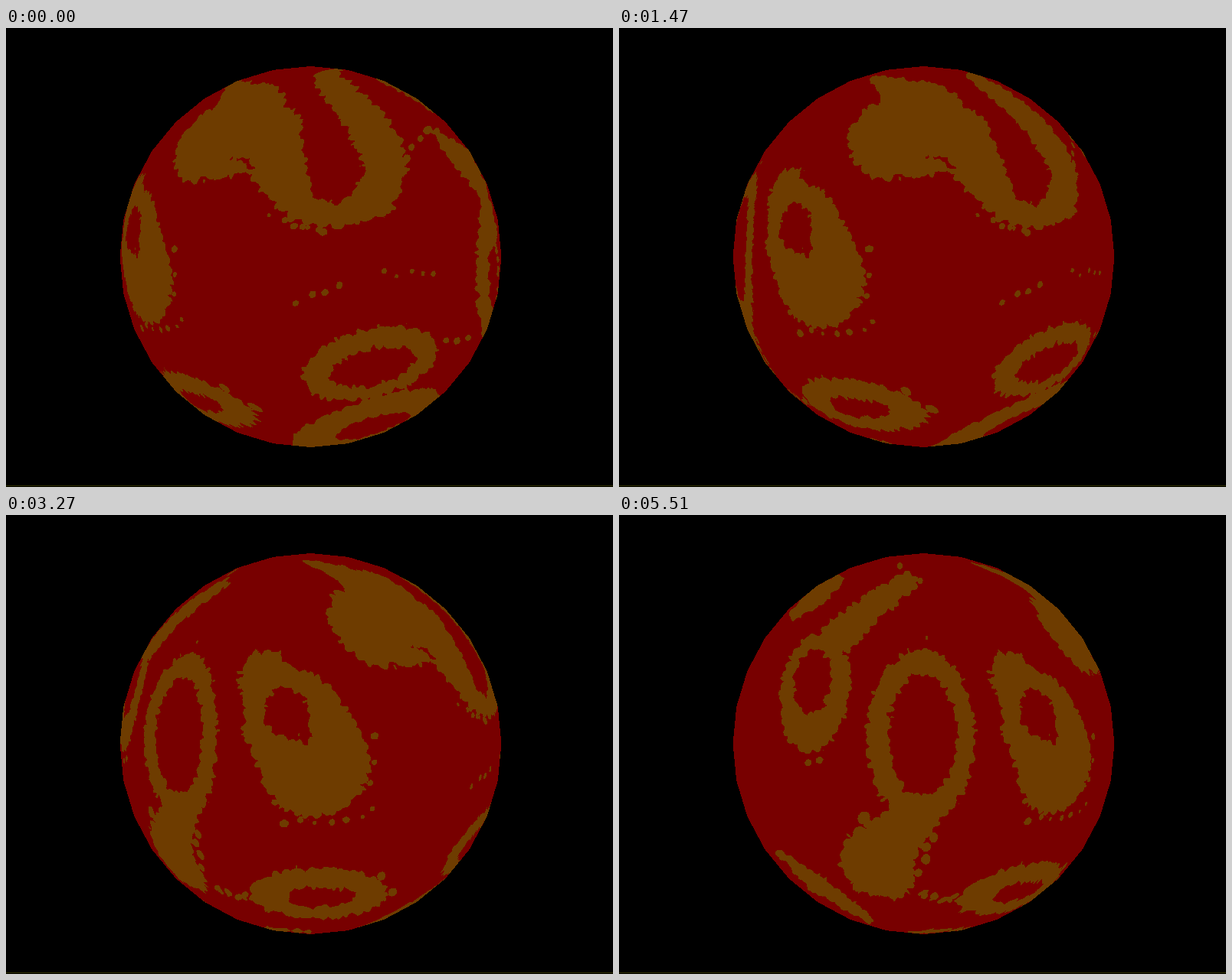
An HTML page with a canvas for the animation above (5550 ms loop, 792 by 600 pixels).

```html
<!DOCTYPE html>
<html lang="en">
<head>
<meta charset="utf-8">
<title>Rotating planet</title>
<style>
  html, body { margin: 0; width: 100%; height: 100%; overflow: hidden; background: #000; }
  canvas { display: block; width: 792px; height: 600px; }
</style>
</head>
<body>
<canvas id="stage" width="792" height="600"></canvas>
<script>
const LOOP = 5550, SPIN = 0.000288; // radians per ms
const CX = 397.5, CY = 299, R = 249, DIST = 5, FOCAL = R * Math.sqrt(DIST * DIST - 1);
// Surface map: pixels per radian, western edge, size
const PPR = 344, WEST = -3.3, MAP_W = Math.ceil(5 * PPR), MAP_H = Math.ceil(Math.PI * PPR);
const turn = t => SPIN * t;

let seed = 7;
function rand(a, b) {
  seed = (seed * 16807) % 2147483647;
  return a + (b - a) * seed / 2147483647;
}

// Shapes are signed distances in screen pixels, negative inside.
// Chain of round joints x, y, r joined by tapering limbs
function arm(...joints) {
  return (x, y) => {
    let best = Infinity;
    for (let i = 0; i + 5 < joints.length; i += 3) {
      const [ax, ay, ar, bx, by, br] = joints.slice(i, i + 6);
      const dx = bx - ax, dy = by - ay;
      const u = Math.max(0, Math.min(1, ((x - ax) * dx + (y - ay) * dy) / (dx * dx + dy * dy)));
      best = Math.min(best, Math.hypot(x - ax - u * dx, y - ay - u * dy) - ar - u * (br - ar));
    }
    return best;
  };
}

// Ellipse, tilted clockwise in degrees
function oval(cx, cy, rx, ry, tilt = 0) {
  const c = Math.cos(tilt * Math.PI / 180), s = Math.sin(tilt * Math.PI / 180);
  return (x, y) => {
    const u = ((x - cx) * c + (y - cy) * s) / rx, v = ((y - cy) * c - (x - cx) * s) / ry;
    const k = Math.hypot(u, v);
    return k * (k - 1) / (Math.hypot(u / rx, v / ry) || 1);
  };
}

// Row of n loose drops from one point to another
function trail(x0, y0, x1, y1, n, size = 4) {
  return Array.from({ length: n }, (_, i) => {
    const u = n > 1 ? i / (n - 1) : 0, r = size * rand(0.6, 1.1);
    return oval(x0 + u * (x1 - x0) + rand(-3, 3), y0 + u * (y1 - y0) + rand(-4, 4), r, r * 1.15, rand(0, 90));
  });
}

// Each group is laid out as it appears on screen at time t
const VIEWS = [
  {
    t: 0,
    land: [
      oval(475, 438, 90, 44, -15), oval(470, 512, 102, 25, -18), oval(628, 318, 14, 92),
      arm(560, 137, 5, 595, 170, 14, 622, 212, 7, 632, 260, 6),
      arm(480, 65, 1, 520, 82, 3, 556, 108, 1),
    ],
    holes: [oval(477, 443, 58, 24, -14), oval(478, 520, 52, 11, -17), oval(636, 325, 6, 42)],
    drops: [
      ...trail(340, 246, 410, 264, 4), ...trail(380, 358, 432, 337, 4), ...trail(494, 320, 560, 322, 5, 3),
      ...trail(520, 170, 550, 130, 4, 5), ...trail(574, 408, 604, 406, 3),
    ],
  },
  {
    t: 1470,
    land: [
      arm(335, 67, 6, 365, 88, 22, 395, 130, 60),
      arm(350, 148, 50, 395, 132, 62, 445, 145, 39, 470, 185, 31, 505, 236, 18, 545, 248, 13,
        576, 230, 20, 582, 195, 16, 568, 160, 15, 540, 125, 14, 500, 90, 10, 460, 62, 6),
    ],
    holes: [arm(400, 168, 2, 420, 170, 3, 432, 182, 3, 426, 206, 4)],
    drops: trail(497, 262, 534, 266, 3),
  },
  {
    t: 3270,
    land: [
      arm(340, 213, 36, 375, 270, 66, 402, 322, 72), oval(407, 494, 89, 33),
      arm(320, 539, 1, 395, 545, 2),
    ],
    holes: [oval(366, 259, 29, 34, -20), arm(385, 290, 8, 396, 286, 6), oval(411, 499, 45, 13)],
    drops: [
      ...trail(350, 378, 360, 400, 2, 5), ...trail(385, 402, 465, 398, 5), ...trail(478, 292, 476, 382, 4, 5),
      ...trail(278, 490, 312, 498, 4), ...trail(490, 474, 504, 494, 2, 5),
    ],
  },
  {
    t: 5510,
    land: [
      oval(393, 290, 70, 114), arm(388, 395, 28, 333, 450, 45, 355, 471, 30),
      oval(255, 232, 44, 78, 9), arm(285, 160, 22, 330, 120, 17, 375, 88, 13),
      arm(207, 440, 3, 255, 480, 11, 325, 528, 5), arm(228, 130, 6, 258, 105, 13, 288, 84, 6),
    ],
    holes: [oval(396, 287, 45, 80), oval(252, 218, 24, 43, 8)],
    drops: [
      ...trail(320, 394, 326, 400, 2, 8), ...trail(408, 418, 392, 466, 4, 6), ...trail(398, 495, 446, 509, 4, 5),
      ...trail(244, 320, 264, 318, 2), ...trail(364, 70, 390, 88, 3), ...trail(400, 162, 400, 162, 1, 3),
    ],
  },
];

// Distance to the nearest of a field of jittered points: gives scalloped rims
const CELL = 10;
function lobes(x, y) {
  const gx = Math.floor(x / CELL), gy = Math.floor(y / CELL);
  let best = Infinity;
  for (let j = gy - 1; j <= gy + 1; j++) for (let i = gx - 1; i <= gx + 1; i++) {
    const h = Math.abs(Math.sin(i * 127.1 + j * 311.7) * 43758.5);
    const px = (i + h % 1) * CELL, py = (j + h * 7 % 1) * CELL;
    best = Math.min(best, Math.hypot(x - px, y - py));
  }
  return best / CELL;
}

const nearest = (shapes, x, y) => shapes.reduce((d, f) => Math.min(d, f(x, y)), Infinity);

function isLand(view, x, y, z) {
  const d = Math.max(nearest(view.land, x, y), -nearest(view.holes, x, y));
  const depth = 11 * Math.min(1, z * 1.2);
  if (d < -depth) return true;
  if (d < depth && d + depth * (lobes(x, y) - 0.48) < 0) return true;
  return nearest(view.drops, x, y) < 0;
}

// Paint a view's shapes onto the map, on the side that faces the viewer
const land = new Uint8Array(MAP_W * MAP_H);
function paint(view) {
  for (let j = 0; j < MAP_H; j++) {
    const lat = j / PPR - Math.PI / 2, sin = Math.sin(lat), cos = Math.cos(lat);
    for (let i = 0; i < MAP_W; i++) {
      const lon = WEST + i / PPR + turn(view.t), z = cos * Math.cos(lon);
      if (z < 1 / DIST) continue;
      const zoom = FOCAL / (DIST - z), k = j * MAP_W + i;
      if (!land[k] && isLand(view, CX + zoom * cos * Math.sin(lon), CY + zoom * sin, z)) land[k] = 1;
    }
  }
}
VIEWS.forEach(paint);

// Screen point -> [longitude, latitude] facing the viewer
function unproject(px, py) {
  const x = px - CX, y = py - CY, q = x * x + y * y + FOCAL * FOCAL;
  const root = Math.sqrt(Math.max(0, (DIST * FOCAL) ** 2 - (DIST * DIST - 1) * q));
  const s = (DIST * FOCAL - root) / q;
  return [Math.atan2(x * s, DIST - FOCAL * s), Math.asin(y * s)];
}

// Globe pixels: place in the image, map row and map column
const SIZE = 502, LEFT = 147, TOP = 48, SIDE = Math.PI / 16;
const place = [], row = [], col = [];
for (let y = 0; y < SIZE; y++) for (let x = 0; x < SIZE; x++) {
  const px = x + LEFT + 0.5, py = y + TOP + 0.5;
  const ang = Math.atan2(py - CY, px - CX);
  const off = ang - (Math.floor(ang / SIDE) + 0.5) * SIDE;
  // faceted silhouette with 32 sides
  if (Math.hypot(px - CX, py - CY) * Math.cos(off) > R * Math.cos(SIDE / 2)) continue;
  const [lon, lat] = unproject(px, py);
  place.push(y * SIZE + x);
  row.push(Math.floor((lat + Math.PI / 2) * PPR) * MAP_W);
  col.push((lon - WEST) * PPR);
}

const g = document.getElementById('stage').getContext('2d');
g.fillStyle = '#000';
g.fillRect(0, 0, 792, 600);
g.fillStyle = '#333300';
g.fillRect(0, 598, 792, 1);

const image = g.createImageData(SIZE, SIZE);
const pixels = new Uint32Array(image.data.buffer).fill(0xff000000);
const PAINT = [0xff000078, 0xff003c6e]; // ABGR: red sea, brown land

function draw(t) {
  const shift = turn(t) * PPR;
  for (let i = 0; i < place.length; i++)
    pixels[place[i]] = PAINT[land[row[i] + ((col[i] - shift) | 0)]];
  g.putImageData(image, LEFT, TOP);
}

const start = performance.now();
function tick() {
  draw((performance.now() - start) % LOOP);
  requestAnimationFrame(tick);
}
draw(0);
requestAnimationFrame(tick);
</script>
</body>
</html>
```
